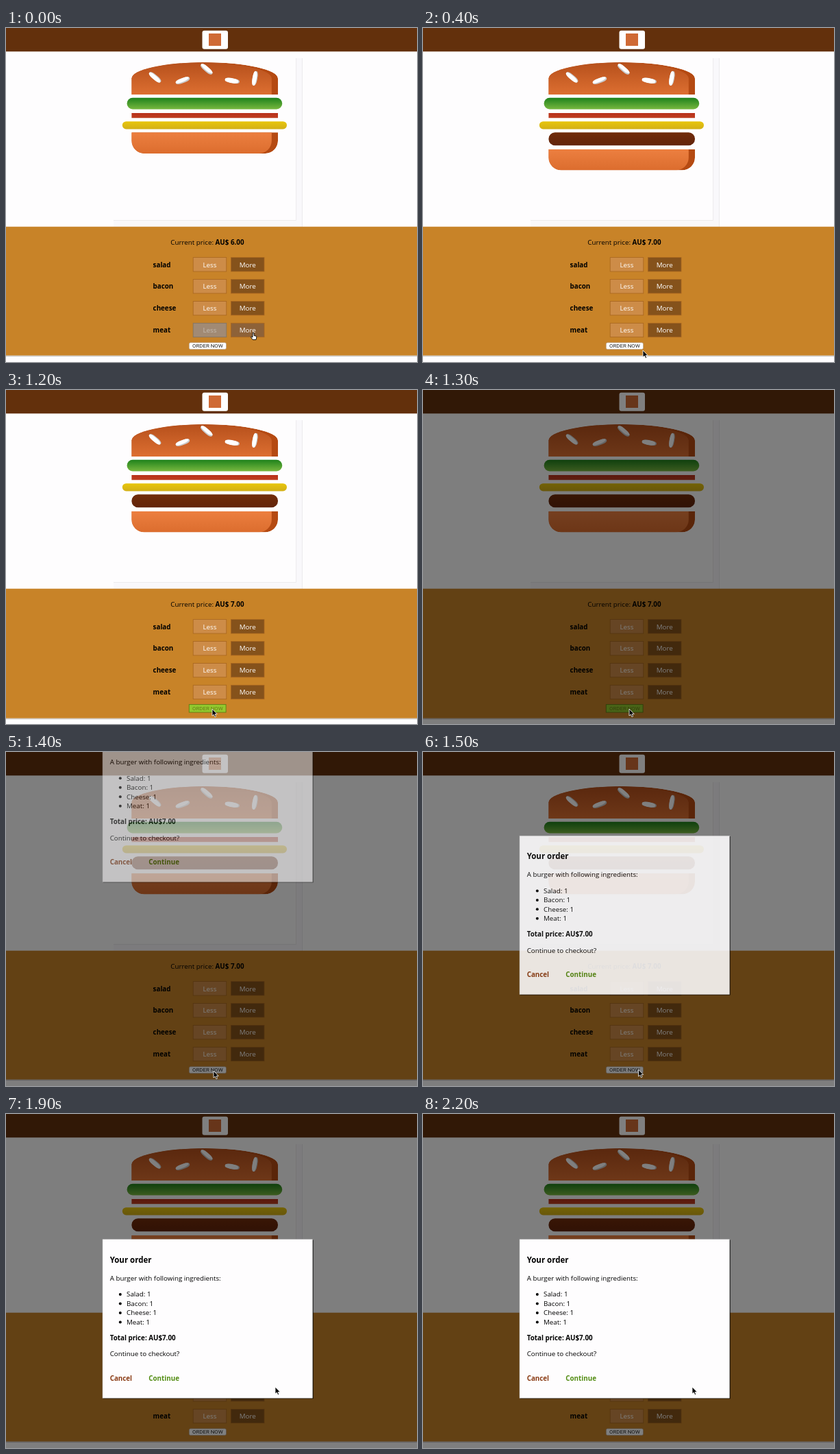
Write an HTML page that moves like this. It is 600 by 487 pixels and loops after 2.3 s.

```html
<!DOCTYPE html>
<html lang="en">
<meta charset="utf-8">
<title>Burger builder</title>
<style>
html, body { margin: 0; width: 100%; height: 100%; overflow: hidden; background: #fefdfe }
svg { display: block; width: 600px; height: 487px }
text { font: 9.8px "Open Sans", "Noto Sans", sans-serif }
.b { font-weight: 700 }
.mid { text-anchor: middle; fill: #fff }
.order { font: 7.9px Roboto, Arial, sans-serif; text-anchor: middle }
</style>
<svg viewBox="0 0 600 487">
  <defs id="defs">
    <path id="topShape" d="M183.4 97V73.5A106.8 23.5 0 0 1 397 73.5V97Z"/>
    <path id="baseShape" d="M183.4 152.3H397V164.5A18.4 18.4 0 0 1 378.6 182.9H201.8A18.4 18.4 0 0 1 183.4 164.5Z"/>
    <clipPath id="topClip"><use href="#topShape"/></clipPath>
    <clipPath id="baseClip"><use href="#baseShape"/></clipPath>
    <clipPath id="seedClip"><rect x="-10.7" y="-3.6" width="21.4" height="7.2" rx="8.5" ry="2.9"/></clipPath>
  </defs>
  <rect width="600" height="487" fill="#fefdfe"/>
  <rect width="600" height="34.3" fill="#63300c"/>
  <rect x="286.5" y="3.7" width="37.5" height="27" rx="3" fill="#fff"/>
  <rect x="296" y="8" width="18" height="18" fill="#cf6a35"/>

  <path d="M423.5 44H433V290H157V280.5H423.5Z" fill="#f9f8fb"/>
  <path d="M423.5 44V280.5H157M432.5 44V290" fill="none" stroke="#e9e7ea" stroke-width=".8"/>

  <g id="burger">
    <g clip-path="url(#topClip)">
      <use href="#topShape" fill="#b54a12"/>
      <use href="#topShape" x="-9.2" fill="url(#bun)"/>
    </g>
    <g id="seeds"></g>
  </g>
  <g id="base"><g clip-path="url(#baseClip)">
    <use href="#baseShape" fill="#b54a12"/>
    <use href="#baseShape" x="-9.2" fill="url(#bread)"/>
  </g></g>

  <rect id="shade" y="477.5" width="600" height="1.6" fill="#cbc8c8"/>
  <rect id="panel" y="289.7" width="600" fill="#c88328"/>
  <text x="240.3" y="316">Current price: <tspan class="b" id="price"></tspan></text>
  <g id="rows"></g>
  <g id="order"><rect/><text class="order" x="294.4">ORDER NOW</text></g>

  <rect id="backdrop" width="600" height="487" fill="#000" opacity=".5"/>
  <g id="modal">
    <rect x="141.8" y="183.6" width="307" height="231.6" fill="#000" opacity=".75"/>
    <rect x="141" y="182.8" width="306.5" height="231.4" fill="#fefdfe" stroke="#bbb" stroke-width=".5"/>
    <text class="b" x="151.7" y="217" style="font-size:11.47px">Your order</text>
    <text x="151.7" y="243">A burger with following ingredients:</text>
    <g id="list"></g>
    <text class="b" x="151.7" y="330">Total price: AU$7.00</text>
    <text x="151.7" y="353.4">Continue to checkout?</text>
    <text class="b" x="151.7" y="388.7" fill="#8a3b14">Cancel</text>
    <text class="b" x="208.3" y="388.7" fill="#528c12">Continue</text>
  </g>
  <path id="arrow" d="M0 0V10L2.3 8L3.9 11.6L5.6 10.8L4.1 7.4H7.2Z" fill="#000" stroke="#fff" stroke-width=".8"/>
  <path id="hand" d="M-1 1Q0-.8 1 1V4.5L4 5.2Q5 5.6 4.8 7L4 10.5H-.8L-3.6 6.6Q-3.4 5.2-1 7Z" fill="#fff" stroke="#000" stroke-width=".9"/>
</svg>
<script>
const $ = id => document.getElementById(id);
const add = (id, html) => $(id).insertAdjacentHTML('beforeend', html);
const set = (el, attrs) => { for (const k in attrs) el.setAttribute(k, attrs[k]); };
const show = (id, on) => { $(id).style.display = on ? '' : 'none'; };

const gradient = (id, from, to) => add('defs',
  `<linearGradient id="${id}" x2="0" y2="1"><stop stop-color="${from}"/><stop offset="1" stop-color="${to}"/></linearGradient>`);
gradient('bun', '#b6501c', '#dd6f31');
gradient('bread', '#ec7f40', '#dc6d2e');

const layer = (id, x, y, w, h, r, from, to) => {
  gradient(id + 'Fill', from, to);
  add('burger', `<rect id="${id}" x="${x}" y="${y}" width="${w}" height="${h}" rx="${r}" fill="url(#${id}Fill)"/>`);
};
layer('salad', 176.6, 101.8, 226.6, 16.7, 8.3, '#1f821c', '#78b83f');
layer('bacon', 183.4, 124, 213.6, 7.2, 0, '#b8301a', '#bf4022');
layer('cheese', 169.8, 136.2, 240.2, 11.2, 5.6, '#e8c60c', '#d3b016');
layer('meat', 183.4, 152.2, 213.6, 19, 9.2, '#712c0a', '#63240a');

// Sesame seeds: centre, angle, and offset of the white face over the grey rim
for (const [x, y, angle, dx, dy] of [
  [258, 76.6, -20, -1.2, -1.8], [217.6, 71.8, 40, -.6, 1.2], [292.8, 60, 40, -.6, -1.8],
  [330.3, 76.8, 10, -1.8, 0], [363.4, 73.3, 100, .6, 1.2]])
  add('seeds', `<g transform="translate(${x} ${y}) rotate(${angle})" clip-path="url(#seedClip)">
    <rect x="-11" y="-4" width="22" height="8" fill="#c9c9c9"/>
    <rect x="${dx - 10.7}" y="${dy - 3.6}" width="21.4" height="7.2" rx="8.5" ry="2.9" fill="#fff"/></g>`);

const button = (id, x, y, label, fill) =>
  `<g id="${id}"><rect x="${x}" y="${y}" width="48.6" height="20.4" fill="${fill}" stroke="#a86620" stroke-width=".8"/>
   <text class="mid" x="${x + 24.3}" y="${y + 13.9}">${label}</text></g>`;

['salad', 'bacon', 'cheese', 'meat'].forEach((name, i) => {
  const y = 334.6 + 31.9 * i, ly = 266.4 + 13.45 * i;
  add('rows', `<text class="b" x="214.6" y="${y + 13.9}">${name}</text>`
    + button('less' + i, 273.2, y, 'Less', '#cd8c48') + button('more' + i, 328.4, y, 'More', '#85521b'));
  add('list', `<circle cx="166.8" cy="${ly - 3.3}" r="2"/>
    <text x="176" y="${ly}">${name[0].toUpperCase() + name.slice(1)}: 1</text>`);
});

// Pointer stops: step, x, y
const stops = [[0, 361, 444], [1, 361, 444], [2, 357, 453], [4, 321, 470], [6, 304, 467], [8, 301, 466],
  [13, 301, 465], [14, 303, 465], [15, 314.5, 463], [16, 361.5, 452], [18, 389, 408], [19, 393, 398], [22, 393, 398]];
function pointer(step) {
  const i = Math.max(1, stops.findIndex(s => s[0] >= step));
  const [a, ax, ay] = stops[i - 1], [b, bx, by] = stops[i];
  const k = (step - a) / (b - a);
  return [ax + (bx - ax) * k, ay + (by - ay) * k];
}

// cubic-bezier(0, 0, .58, 1)
function easeOut(x) {
  let lo = 0, hi = 1;
  for (let i = 0; i < 20; i++) {
    const s = (lo + hi) / 2;
    if (1.74 * s * s - .74 * s ** 3 < x) lo = s; else hi = s;
  }
  return lo * lo * (3 - 2 * lo);
}

function draw(ms) {
  const step = Math.floor(ms / 100), added = step >= 1;
  const hover = step >= 5 && step < 14, shift = hover ? 1.1 : 0;

  show('meat', added);
  set($('base'), { transform: `translate(0 ${added ? 24.5 : 0})` });
  $('price').textContent = added ? 'AU$ 7.00' : 'AU$ 6.00';

  const [lessBox, lessText] = $('less3').children;
  set(lessBox, added ? { fill: '#cd8c48', stroke: '#a86620' } : { fill: '#a18a74', stroke: '#7e7365' });
  lessText.style.fill = added ? '#fff' : '#c5bbb0';
  set($('more3').firstElementChild, { fill: step < 2 ? '#8e6238' : '#85521b' });

  set($('panel'), { height: 187.8 + shift });
  set($('shade'), { y: 477.5 + shift });
  const [box, label] = $('order').children;
  set(box, hover
    ? { x: 267.3, y: 458.6, width: 53.8, height: 11.4, rx: 0, fill: '#92c92e', stroke: '#5e7c14', 'stroke-width': .9 }
    : { x: 267.3, y: 458.8, width: 54.2, height: 9.6, rx: 2, fill: '#fff', stroke: '#a99682', 'stroke-width': .6 });
  set(label, { y: hover ? 467 : 466.3, fill: hover ? '#687d18' : '#222' });

  show('backdrop', step >= 13);
  show('modal', step >= 13);
  const shown = easeOut(Math.min(1, Math.max(0, (step * 100 - 1288) / 300)));
  set($('modal'), { transform: `translate(0 ${-487 * (1 - shown)})`, opacity: shown });

  const at = { transform: `translate(${pointer(step)})` };
  show('hand', step < 2);
  show('arrow', step >= 2);
  set($('hand'), at);
  set($('arrow'), at);
}

const start = performance.now();
function tick() {
  draw((performance.now() - start) % 2300);
  requestAnimationFrame(tick);
}
tick();
</script>
</html>
```
